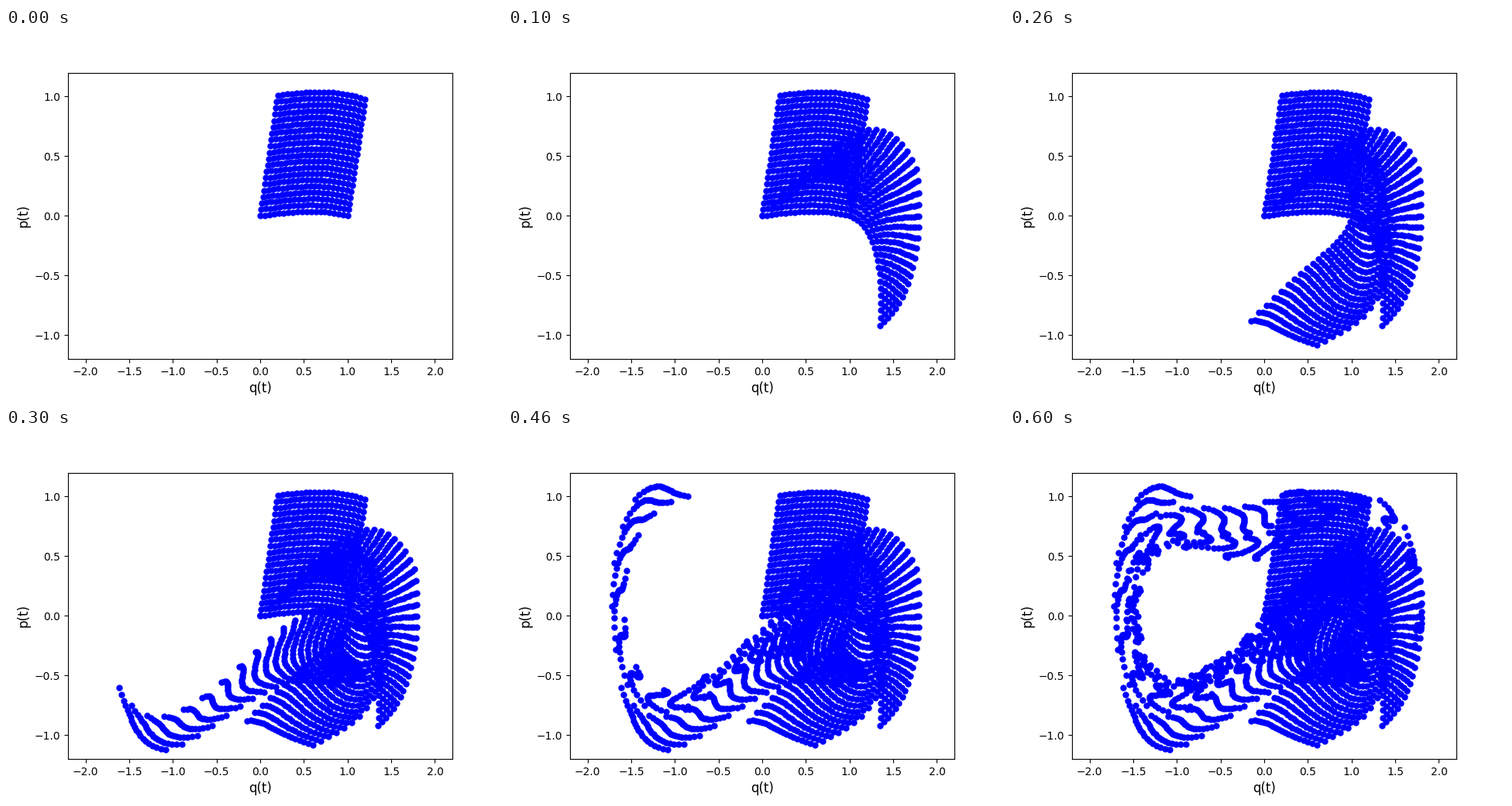
Write a matplotlib script that moves like this. It is 640 px wide and 480 px high and loops after 0.7 s.

```python
import numpy as np
import matplotlib.pyplot as plt
from matplotlib.animation import FuncAnimation

# Phase flow of H(q, p) = p^2 + (q^2 - 1)^2 / 4 over the unit square
N = 20
D = 0.001
TIMES = 0.1 + 0.8 * np.arange(7)


def force(q):
    return -2 * q * (q * q - 1)


def evolve(q, v, times):
    """Explicit Euler; momentum is half the backward difference of q."""
    clouds, done = [], 0
    for t in times:
        steps = int(round(t / D))
        for _ in range(steps - done):
            back = v
            q, v = q + D * v, v + D * force(q)
        done = steps
        clouds.append((q, back / 2))
    return clouds


q0, v0 = np.meshgrid(np.linspace(0, 1, N), np.linspace(0, 2, N))
clouds = evolve(q0.ravel(), v0.ravel(), TIMES)

fig, ax = plt.subplots(figsize=(6.4, 4.8), dpi=100)
ax.set_xlim(-2.2, 2.2)
ax.set_ylim(-1.2, 1.2)
ax.set_xlabel("q(t)", fontsize=12)
ax.set_ylabel("p(t)", fontsize=12)
dots, = ax.plot([], [], "bo", markersize=5)


def update(i):
    dots.set_data(*np.hstack(clouds[:i + 1]))
    return dots,


anim = FuncAnimation(fig, update, frames=len(TIMES), interval=100, repeat=True)
plt.show()
```
